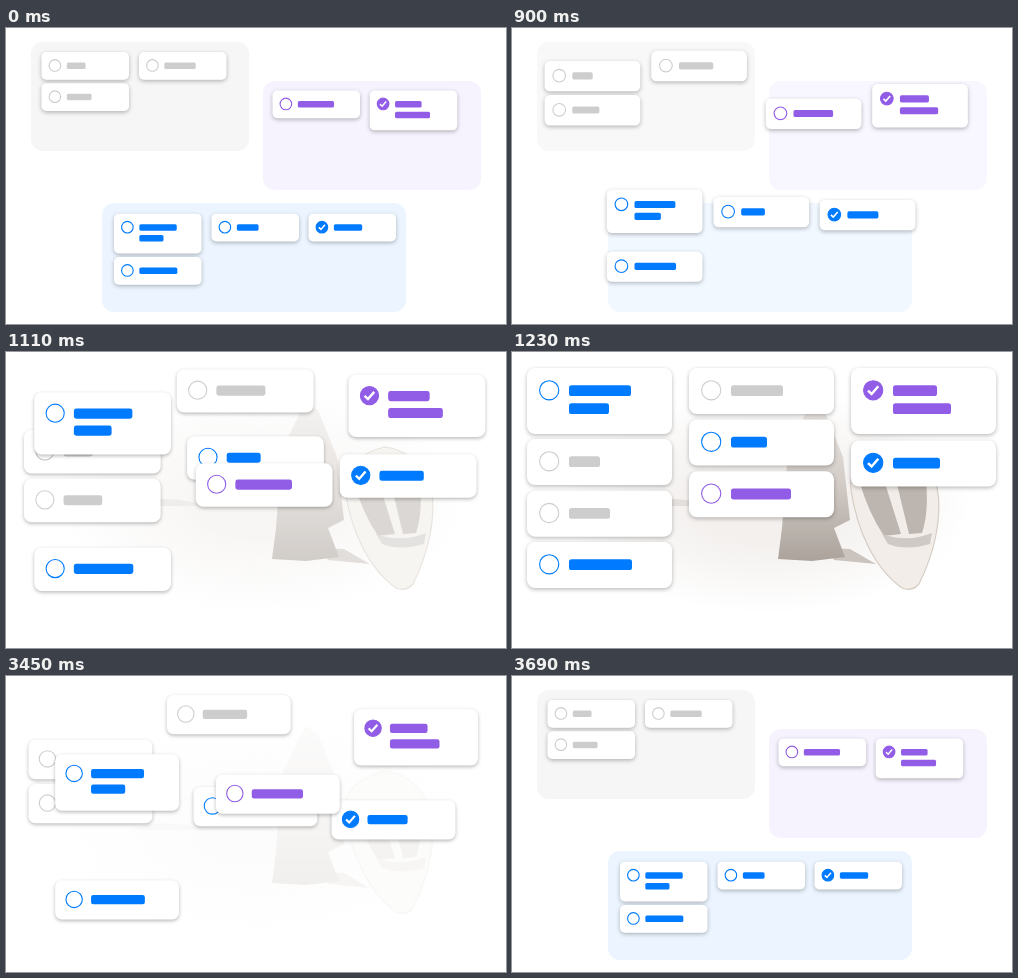
These frames come from a looping animation (500x296 px, 3.72 s). An HTML page:

```html
<!DOCTYPE html>
<html lang="en">
<head>
<meta charset="utf-8">
<title>Task boards merging</title>
<style>
html, body { margin: 0; width: 100%; height: 100%; overflow: hidden; background: #fff; }
#stage {
  --p: 0;
  --s: calc(.6034 + .3966 * var(--p));
  position: relative; width: 500px; height: 296px; overflow: hidden;
}
#stage > * { position: absolute; }
.panel { height: 109px; border-radius: 12px; opacity: calc(1 - 2 * var(--p)); }
.photo {
  left: 0; top: 0;
  opacity: calc(var(--p) * var(--p) * var(--p) * var(--p));
}
.card {
  left: 0; top: 0; width: 145px; border-radius: 8px; background: #fff;
  transform-origin: 0 0;
  transform:
    translate(calc(var(--ax) + (var(--bx) - var(--ax)) * var(--p)),
              calc(var(--ay) + (var(--by) - var(--ay)) * var(--p)))
    scale(var(--s));
  box-shadow: 0 calc(1.5px / var(--s)) calc(4px / var(--s)) rgba(0, 0, 0, .28);
}
.card svg { display: block; }
.ring { fill: #fff; stroke: currentColor; stroke-width: calc(1.1px / var(--s)); }
.done .ring { fill: currentColor; }
.tick { fill: none; stroke: #fff; stroke-width: 2.5; }
.bar { fill: currentColor; }
</style>
</head>
<body>
<div id="stage">
  <div class="panel" style="left:25px;top:14px;width:218px;background:#f6f6f6"></div>
  <div class="panel" style="left:257px;top:53px;width:218px;background:#f6f3fe"></div>
  <div class="panel" style="left:96px;top:175px;width:304px;background:#ecf5ff"></div>
  <svg class="photo" width="500" height="296">
    <defs>
      <radialGradient id="sand">
        <stop offset=".35" stop-color="#f3f0ee"/>
        <stop offset="1" stop-color="#f3f0ee" stop-opacity="0"/>
      </radialGradient>
      <linearGradient id="bark" x2="0" y2="1">
        <stop offset="0" stop-color="#eeebe9"/>
        <stop offset=".5" stop-color="#d3ccc7"/>
        <stop offset="1" stop-color="#aaa29b"/>
      </linearGradient>
    </defs>
    <ellipse cx="255" cy="150" rx="205" ry="112" fill="url(#sand)"/>
    <path d="M125 154Q150 143 180 149T265 149V154Z" fill="#e3dfdc"/>
    <path d="M315 196L338 197 364 212 322 208Z" fill="#cbc4be"/>
    <path d="M276 98L299 50 312 58 331 105 338 168 322 176 333 205 300 209 266 207 270 176Z" fill="url(#bark)"/>
    <path d="M378 95C350 103 336 117 339 138 345 178 362 216 390 236Q400 240 407 232C422 202 431 165 425 135 418 112 400 97 378 95Z"
          fill="#f2ede8" stroke="#d6cdc5" stroke-width="1.2"/>
    <path d="M347 128H372L389 182 372 184Q356 160 347 128ZM384 128H414Q417 160 410 181L397 182Z" fill="#bdb6b0"/>
    <path d="M370 182Q395 191 420 181L418 192Q394 199 376 192Z" fill="#cfcac6"/>
  </svg>
</div>
<script>
const stage = document.getElementById('stage');
const GRAY = '#cdcdcd', BLUE = '#007bff', PURPLE = '#915ce6';

// colour, start x y, end x y, bar widths, done
const cards = [
  [GRAY, 35.5, 24, 15, 87, [31]],
  [GRAY, 133, 24, 177, 16, [52]],
  [GRAY, 35.5, 55.2, 15, 138.7, [41]],
  [BLUE, 108, 185.7, 15, 16, [62, 40]],
  [BLUE, 205.5, 185.7, 177, 67.5, [36]],
  [BLUE, 302.5, 185.7, 339, 88.5, [47], true],
  [BLUE, 108, 229, 15, 190, [63]],
  [PURPLE, 266.5, 62.5, 177, 119.3, [60]],
  [PURPLE, 363.7, 62.5, 339, 16, [44, 58], true]
];

for (const [color, ax, ay, bx, by, bars, done] of cards) {
  const height = bars.length > 1 ? 66 : 46;
  const lines = bars.map((w, i) =>
    `<rect class="bar" x="42" y="${17.3 + 18 * i}" width="${w}" height="10.8" rx="2.6"/>`);
  const tick = done ? '<path class="tick" d="M17 22.6L20.6 26 27.3 18.3"/>' : '';
  const card = document.createElement('div');
  card.className = done ? 'card done' : 'card';
  card.style.cssText = `--ax:${ax}px;--ay:${ay}px;--bx:${bx}px;--by:${by}px;height:${height}px;color:${color}`;
  card.innerHTML = `<svg width="145" height="${height}">
    <circle class="ring" cx="22.2" cy="22.3" r="9.6"/>${tick}${lines.join('')}</svg>`;
  stage.append(card);
}

const LOOP = 3720, STEP = 30;
const ramp = (t, from, to) => Math.min(1, Math.max(0, (t - from) / (to - from)));
const ease = u => u < .5 ? 2 * u * u : 1 - 2 * (1 - u) ** 2;

function draw(now) {
  const t = Math.floor((now % LOOP) / STEP) * STEP;
  const p = ease(ramp(t, 780, 1230)) - ease(ramp(t, 3270, 3690));
  stage.style.setProperty('--p', p.toFixed(5));
  requestAnimationFrame(draw);
}
requestAnimationFrame(draw);
</script>
</body>
</html>
```
